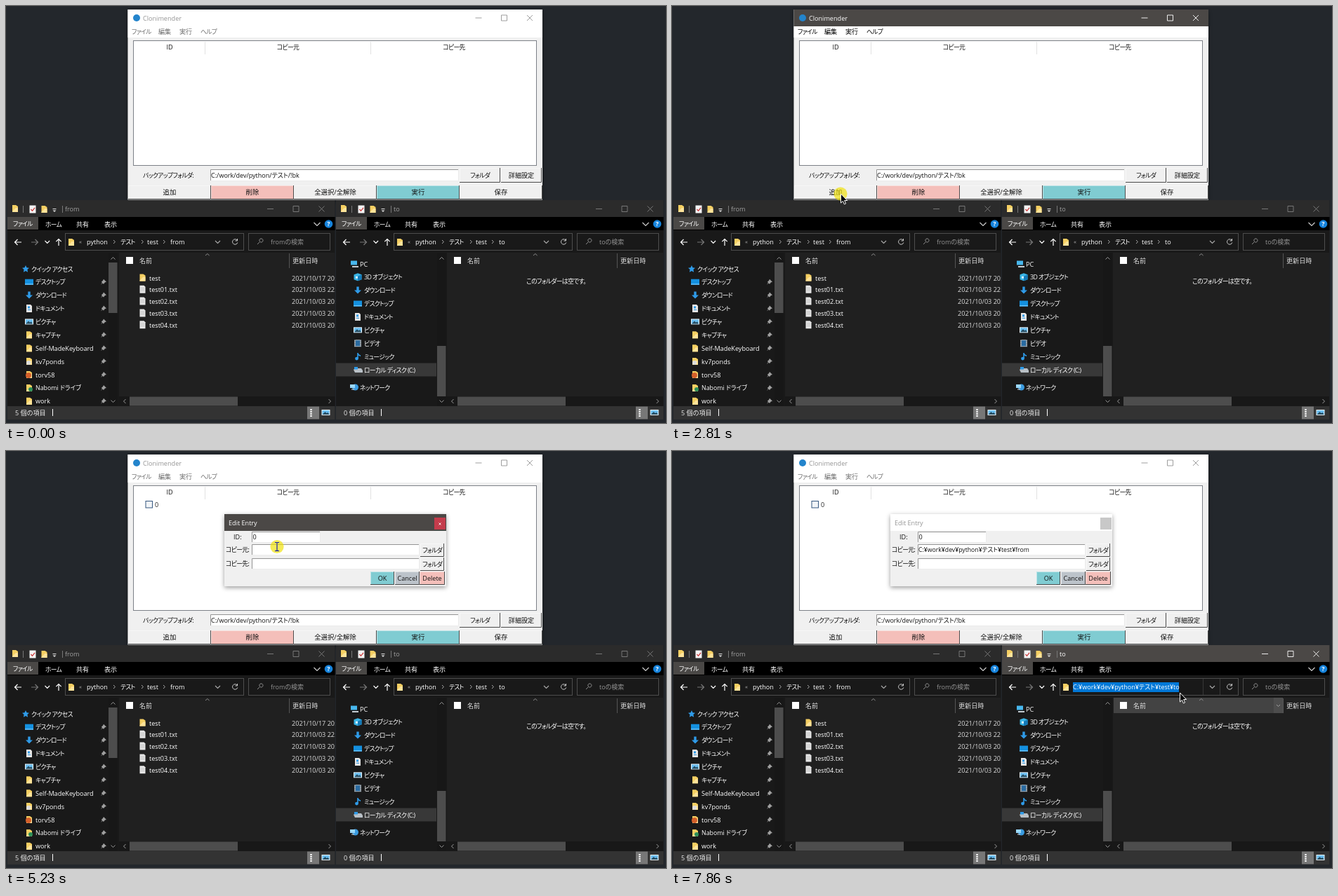
Write an HTML page that moves like this. It is 940 by 595 pixels and loops after 8 s.

```html
<!DOCTYPE html>
<html lang="ja">
<head>
<meta charset="utf-8">
<title>Backup tool demo</title>
<style>
html, body { margin: 0; width: 100%; height: 100%; overflow: hidden; background: #23272c; }
svg { display: block; width: 100vw; height: 100vh; }
text { font-family: "Open Sans", "Noto Sans CJK JP", sans-serif; font-feature-settings: "palt"; white-space: pre; }
.tight { letter-spacing: -.65px; }
</style>
</head>
<body>
<svg id="stage" viewBox="0 0 940 595" xmlns="http://www.w3.org/2000/svg"></svg>
<script>
const rect = (x, y, w, h, fill, extra = '') =>
  `<rect x="${x}" y="${y}" width="${w}" height="${h}" fill="${fill}" ${extra}/>`;
const line = (d, color, width = 1, extra = '') =>
  `<path d="${d}" fill="none" stroke="${color}" stroke-width="${width}" ${extra}/>`;
const shape = (d, fill) => `<path d="${d}" fill="${fill}"/>`;
const dot = (x, y, r, fill) => `<circle cx="${x}" cy="${y}" r="${r}" fill="${fill}"/>`;
const group = (id, body, extra = '') => `<g id="${id}" ${extra}>${body}</g>`;
const at = (x, y, body) => `<g transform="translate(${x} ${y})">${body}</g>`;
// Pure katakana labels are set tight, like a UI font.
const text = (x, y, s, fill = '#fff', { size, anchor = 'start', extra = '' } = {}) =>
  `<text x="${x}" y="${y}" fill="${fill}" text-anchor="${anchor}" ` +
  `font-size="${size || (/[ぁ-ヿ]/.test(s) ? 8.8 : 9.1)}" ` +
  `${/[ァ-ヿ]/.test(s) && !/[a-z]/.test(s) ? 'class="tight"' : ''} ${extra}>${s}</text>`;
const mid = (x, y, s, fill = '#111', size) => text(x, y, s, fill, { anchor: 'middle', size });

// Minimise, maximise and close signs; x is the centre of the first one.
const controls = (x, y, gap) =>
  line(`M${x - 4.5} ${y}h9M${x + gap - 4} ${y - 4}h8v8h-8z` +
    `M${x + 2 * gap - 4} ${y - 4}l8 8m0-8l-8 8`, 'currentColor', .9);

const button = (x, y, w, h, fill, label, size) =>
  rect(x, y, w, h, fill) +
  line(`M${x + .5} ${y + h - 1}V${y + .5}H${x + w - 1}`, '#fff', 1, 'opacity=".5"') +
  line(`M${x} ${y + h - .5}H${x + w - .5}V${y}`, '#4c4c4c') +
  mid(x + w / 2, y + h / 2 + 3.2, label, '#111', size);

const field = (x, y, w, h) =>
  rect(x, y, w, h, '#fff') +
  line(`M${x + .5} ${y + h}V${y + .5}H${x + w}`, '#949494') +
  line(`M${x} ${y + h - .5}H${x + w - .5}V${y}`, '#ececec');

const pink = '#f4bfba', teal = '#80ccd2', grey = '#f0f0f0', blue = '#2f9be8';

const folder = shape('M-4-5h5l3 2v8h-8z', '#f5cf62') + shape('M1-1h3v6h-8v-1z', '#ffe49a');
const sheet = shape('M-4-5.5h6l2 2v9h-8z', '#e6e6e6');
const icons = {
  folder,
  file: sheet + line('M-2.5-2h5m-5 2h5m-5 2h5', '#bbb', .8),
  star: shape('M0-5l1.5 3.3 3.5.4-2.6 2.4.7 3.6L0 2.9l-3.1 1.8.7-3.6L-5-1.3l3.5-.4z', blue),
  desk: rect(-6, -4, 12, 8, '#1490df') + rect(-6, 2.5, 12, 1.5, '#64c4ff'),
  down: shape('M-1.7-5h3.4v5H5L0 5-5 0h3.3z', blue),
  doc: sheet + rect(-2, -3, 3, 3, blue) + line('M-2 2h4', blue),
  pic: rect(-6, -4, 12, 8, '#e8f4fb') + rect(-5, -3, 10, 6, '#69bdf0') + shape('M-5 3l4-4 2 2 2-1 2 3z', '#264d62'),
  mark1: folder + dot(-1, 2, 3, '#ddd'),
  mark2: folder + dot(-1, 1, 4, '#d4602a'),
  mark3: folder + dot(2, 2, 3, '#2c8f57'),
  cube: shape('M0-5.5l5.5 2v7L0 5.5l-5.5-2v-7z', '#39b5e6') + shape('M0-1l5.5-2.5v7L0 5.5z', '#1479b8') + shape('M-3-1h3v3h-3z', '#d9f5ff'),
  film: rect(-5, -5, 10, 10, '#a9b8c4') + rect(-3, -4, 6, 8, '#2a6ba1') + line('M-4-5v10M4-5v10', '#333', 1, 'stroke-dasharray="1.2 1.2"'),
  note: line('M0 3V-5q0 3 4 4', blue, 1.6) + dot(-1.5, 3, 2.4, blue),
  disk: shape('M-6 0l2-2h9l2 3v3h-11z', '#b9c0c6') + rect(-5, -4, 5, 3.5, blue),
  net: dot(1.5, 0, 4.5, '#3a9be0') + rect(-6, -4, 7, 5, '#9bd8fa') + line('M-4 3h4', '#ddd'),
  pc: rect(-5, -4.5, 9, 6, '#48b8ee') + shape('M-3 3h9v2h-9z', '#c3ccd2')
};
const icon = (name, x, y) => at(x, y, icons[name]);

function app() {
  const tools = [['追加', grey], ['削除', pink], ['全選択/全解除', grey], ['実行', teal], ['保存', grey]];
  return rect(173.5, 5, 590.5, 271.5, grey, 'filter="url(#soft)"') +
    rect(173.5, 29, 590.5, 16, '#fff') +
    rect(173.5, 5, 590.5, 24, '#fff', 'id="appBar"') + dot(186, 17, 5, '#2384cc') +
    group('appTitle', text(195, 21, 'Clonimender', 'currentColor') + controls(673, 17, 36.5)) +
    group('appMenu', [[179, 'ファイル'], [217, '編集'], [247, '実行'], [277, 'ヘルプ']]
      .map(([x, s]) => text(x, 40, s, 'currentColor')).join('')) +
    rect(181.5, 49.5, 574, 178, '#fff', 'stroke="#7c8087"') +
    line('M283.5 51v18M519.5 51v18', '#e2e2e2') +
    mid(233, 62, 'ID') + mid(401.5, 62, 'コピー元') + mid(638, 62, 'コピー先') +
    group('entry', rect(199, 71.5, 9.5, 9.5, '#f2f5f8', 'stroke="#35577f"') + text(212, 80, '0', '#222')) +
    text(195, 245, 'バックアップフォルダ:', '#111') +
    field(291, 233, 354, 17) + text(292, 245, 'C:/work/dev/python/テスト/!bk', '#111', { size: 9 }) +
    button(646, 231, 58, 21, grey, 'フォルダ') + button(705, 231, 58, 21, grey, '詳細設定') +
    tools.map(([s, c], i) => button(174 + i * 118, 256, 118, 20, c, s, 9.4)).join('');
}

function dialog() {
  const rows = [[144, 'コピー元:'], [164, 'コピー先:']];
  return rect(311, 90, 316, 103, grey, 'filter="url(#soft)"') +
    rect(311, 90, 316, 24, '#fff', 'id="dlgBar"') +
    text(317, 106, 'Edit Entry', '#fff', { extra: 'id="dlgTitle"' }) +
    rect(610, 95, 16, 17, '#c43c4c', 'id="dlgClose"') + line('M616.5 102.5l3 3m0-3l-3 3', '#fff', .9, 'id="dlgCross"') +
    text(324, 126, 'ID:', '#111') + field(350, 115, 98, 16) + text(351.5, 126, '0', '#111') +
    rows.map(([y, s]) => text(313, y, s, '#111') + field(350, y - 11, 239, 16) +
      button(590, y - 12, 34, 19, grey, 'フォルダ')).join('') +
    group('pasted', text(351, 144, 'C:¥work¥dev¥python¥テスト¥test¥from', '#111', { size: 8.7 })) +
    button(519, 172, 34, 19, teal, 'OK') + button(554, 172, 35, 19, '#bcc3ca', 'Cancel') +
    button(589, 172, 36, 19, pink, 'Delete');
}

function addressBar(id, name) {
  const crumbs = [[115, 'python'], [163, 'テスト'], [201, 'test'], [234, name]];
  return rect(84.5, 324.5, 254, 24, '#191919', 'stroke="#4d4d4d"') +
    icon('folder', 93, 337) +
    group(id + 'Crumbs', text(104, 339, '«', '#aaa', { size: 8 }) +
      crumbs.map(([x, s]) => text(x, 340, s)).join('') +
      line('M153 334l2.5 2.5-2.5 2.5M193 334l2.5 2.5-2.5 2.5M224 334l2.5 2.5-2.5 2.5', '#aaa')) +
    group(id + 'Edit', rect(103, 330, id === 'left' ? 162 : 151, 14, '#0078d7') +
      text(103, 340, 'C:¥work¥dev¥python¥テスト¥test¥' + name, '#fff', { size: 9 }) +
      line('M288.5 325v23M312.5 325v23', '#383838')) +
    line('M298 335l3.5 3.5 3.5-3.5', '#aaa', 1.1) +
    line('M329 334a3.7 3.7 0 1 0 .8 3.5M329.5 332v3h-3', '#ccc') +
    rect(345.5, 324.5, 116, 24, '#191919', 'stroke="#4d4d4d"') +
    line('M358 340l3-3m-.2-2.8a2.6 2.6 0 1 1 .8 2.2z', '#999', .9) +
    text(377, 340, name + 'の検索', '#929292', { size: 9 });
}

function navItem([kind, label, y, root], pinned) {
  const pin = at(139, y, shape('M0-4l4 4-2 .5L0 3l-1.5-1.3L-4 4l2-3L-3.2 0-1-2z', '#a0a0a0'));
  return icon(kind, root ? 28 : 33, y) + text(root ? 36 : 42, y + 3.5, label) + (pinned && !root ? pin : '');
}

function explorer(id, dx, o) {
  const ribbon = [[56, 'ホーム'], [100, '共有'], [140, '表示']];
  const body = rect(161, 352, 308, 219, '#202020') + o.hover +
    rect(171, 358, 10, 10, '#fff') + text(190, 367, '名前', '#ddd') +
    line('M284 356l2.8-2.5 2.8 2.5', '#999', .9) +
    line('M403.5 353v21', '#555') + text(408, 367, '更新日時', '#ddd') + o.list +
    rect(161, 557, 308, 14, '#181818') + rect(176, 557.5, 154, 13, '#4d4d4d') +
    line('M170.5 561l-3 3 3 3M459.5 561l3 3-3 3', '#999');
  const win = rect(2, 277, 467, 313, '#191919') +
    rect(2, 277, 467, 24, '#2b2b2b', `id="${id}Bar"`) +
    icon('folder', 13, 289) + line('M24.5 285v10M80.5 285v10', '#777') +
    rect(33.5, 284.5, 9, 11, '#f4f4f4') + line('M35.5 290l2 2.3 3.5-4.5', '#c33', 1.2) +
    icon('folder', 54.5, 290) + line('M66.5 289.5h5', '#ddd') + shape('M66.5 291.5h5l-2.5 2.5z', '#ddd') +
    text(84, 293, o.name, 'currentColor', { extra: `id="${id}Title"` }) +
    group(id + 'Controls', controls(376.5, 289.5, 36.5)) +
    rect(2, 301, 467, 19, '#000') + rect(2, 301, 44, 18, '#4a4846') + text(10, 314, 'ファイル') +
    ribbon.map(([x, s]) => text(x, 314.5, s)).join('') +
    line('M438.5 309l4.5 4.5 4.5-4.5', '#ccc', 1.2) + dot(459.5, 311, 5.8, '#1583dc') +
    text(459.5, 314.2, '?', '#fff', { size: 9, anchor: 'middle', extra: 'font-weight="700"' }) +
    line('M22 337H12.5m4-4l-4 4 4 4M55.5 335l3.3 3.3 3.3-3.3M75 342v-9.5m-3.7 3.7l3.7-3.7 3.7 3.7', '#fff', 1.2) +
    line('M36 337h9.5m-4-4l4 4-4 4', '#777', 1.2) +
    addressBar(id, o.name) + o.nav +
    rect(146, 352, 13, 219, '#171717') + rect(146, o.thumb, 12.5, 72, '#4d4d4d') +
    line('M149.5 361.5l3-3 3 3M149.5 562.5l3 3 3-3', '#999') +
    `<g transform="translate(${dx ? -1 : 0} 0)">${body}</g>` +
    rect(2, 571, 467, 19, '#333') + text(13, 584, o.count + ' 個の項目', '#eee', { size: 9.1 }) +
    line('M66.5 575v10', '#fff') + rect(429, 571.5, 17, 18, '#777') +
    line('M434.5 575v11', '#fff', 2.4, 'stroke-dasharray="2 1"') + icon('pic', 455.5, 580);
  return `<g transform="translate(${dx} 0)" clip-path="url(#pane)">${win}</g>`;
}

const quick = [['star', 'クイック アクセス', 375, true]].concat(
  [['desk', 'デスクトップ'], ['down', 'ダウンロード'], ['doc', 'ドキュメント'], ['pic', 'ピクチャ'],
   ['folder', 'キャプチャ'], ['folder', 'Self-MadeKeyboard'], ['mark1', 'kv7ponds'], ['mark2', 'torv58'],
   ['mark3', 'Nabomi ドライブ'], ['folder', 'work']].map(([k, s], i) => [k, s, 393.7 + i * 18.9]));

const drives = [['pc', 'PC', 368, true]].concat(
  [['cube', '3D オブジェクト'], ['down', 'ダウンロード'], ['desk', 'デスクトップ'], ['doc', 'ドキュメント'],
   ['pic', 'ピクチャ'], ['film', 'ビデオ'], ['note', 'ミュージック'], ['disk', 'ローカル ディスク (C:)']]
    .map(([k, s], i) => [k, s, 386.7 + i * 18.9]), [['net', 'ネットワーク', 544, true]]);

const rowY = i => 388 + i * 16.8;
const files = ['test', 'test01.txt', 'test02.txt', 'test03.txt', 'test04.txt'].map((s, i) =>
  icon(i ? 'file' : 'folder', 194.5, rowY(i) - .5) + text(204, rowY(i) + 3.5, s) +
  text(407, rowY(i) + 3.5, ['2021/10/17 20:31', '2021/10/03 22:14'][i] || '2021/10/03 20:52', '#ddd')).join('');

document.getElementById('stage').innerHTML =
  `<defs><clipPath id="pane"><rect x="2" y="277" width="466.5" height="313"/></clipPath>
   <filter id="soft" x="-10%" y="-10%" width="120%" height="125%"><feDropShadow dx="0" dy="2" stdDeviation="3" flood-opacity=".4"/></filter></defs>` +
  rect(0, 0, 940, 595, '#23272c') + app() + group('dialog', dialog()) +
  explorer('left', 0, {
    name: 'from', count: 5, thumb: 366, list: files,
    nav: quick.map(q => navItem(q, true)).join(''),
    hover: rect(173, 0, 300, 16.8, '#333', 'id="rowHover"') +
      rect(173.5, 446.5, 300, 17, 'none', 'id="rowFocus" stroke="#6c6c6c"')
  }) +
  explorer('right', 468, {
    name: 'to', count: 0, thumb: 485,
    list: mid(316.5, 396, 'このフォルダーは空です。', '#fff'),
    nav: rect(2, 509.5, 143, 19, '#383838') + drives.map(d => navItem(d)).join(''),
    hover: group('headHover', rect(162, 352, 241, 22, '#434343') + rect(390, 352, 13, 22, '#4d4d4d') +
      line('M394 362l2.5 2.5 2.5-2.5', '#aaa', .9))
  }) +
  line('M265.5 330v14', '#fff', 1, 'id="caret"') +
  `<circle id="click" r="9.6" fill="#f0e000" opacity=".66"/>` +
  `<path id="arrow" d="M.5 0v13l2.9-2.7 2 4.6 2.2-1-2-4.4h4z" fill="#000" stroke="#fff" stroke-width="1"/>` +
  `<path id="beam" d="M-3-6h2.2l.8.7.8-.7h2.2M-3 6h2.2l.8-.7.8.7h2.2M0-6v12" fill="none" stroke="#fff" stroke-width="1.1" style="mix-blend-mode:difference"/>`;

const el = {};
document.querySelectorAll('[id]').forEach(n => el[n.id] = n);

// Pointer stops: time, x, y.
const stops = [
  [300, 664, 559], [630, 376, 398], [880, 376, 398], [1390, 268, 341], [2390, 268, 341],
  [2760, 240, 268], [3200, 240, 268], [3540, 302, 118], [3570, 302, 118], [3890, 334, 75],
  [4600, 334, 75], [5090, 386, 136.5], [5460, 386, 136.5], [5750, 525, 146], [5880, 525, 146],
  [6010, 524, 157], [6040, 524, 157], [6400, 795, 470], [6520, 795, 470], [6640, 776, 393],
  [6690, 776, 393], [7040, 722.5, 339], [7710, 722.5, 339], [7850, 723, 345], [8000, 723, 345]
];
const clicks = [[770, 850], [1400, 1560], [2780, 2900], [4020, 4090], [4150, 4220], [5230, 5360], [6410, 6490], [7240, 7370]];

function pointer(t) {
  const i = Math.max(1, stops.findIndex(s => s[0] > t));
  const [t0, x0, y0] = stops[i - 1], [t1, x1, y1] = stops[i];
  const u = Math.min(1, Math.max(0, (t - t0) / (t1 - t0))), k = u * u * (3 - 2 * u);
  return [x0 + (x1 - x0) * k, y0 + (y1 - y0) * k];
}

const show = (id, on) => el[id].style.display = on ? '' : 'none';
const fill = (id, c) => el[id].setAttribute('fill', c);
const color = (id, c) => el[id].style.color = c;

function draw(t) {
  const within = (a, b = 8000) => t >= a && t < b;
  const [x, y] = pointer(t);
  const appOn = within(2800, 4210), leftOn = within(830, 2800), rightOn = within(6430);
  const leftEdit = within(1580, 2800), rightEdit = within(7300), dlg = within(4210);
  const dlgOn = dlg && !rightOn;
  const bar = '#4b4846', off = '#949494';

  fill('appBar', appOn ? bar : '#fff');
  color('appTitle', appOn ? '#fff' : off);
  color('appMenu', appOn ? '#000' : '#6d6d6d');
  show('entry', within(2950));

  show('dialog', dlg);
  fill('dlgBar', dlgOn ? bar : '#fff');
  fill('dlgTitle', dlgOn ? '#fff' : off);
  fill('dlgClose', dlgOn ? '#c43c4c' : '#c8c8c8');
  show('dlgCross', dlgOn);
  show('pasted', within(5420));

  for (const [id, on, edit] of [['left', leftOn, leftEdit], ['right', rightOn, rightEdit]]) {
    fill(id + 'Bar', on ? bar : '#2b2b2b');
    color(id + 'Controls', on ? '#fff' : '#808080');
    color(id + 'Title', on && !within(6430, 6560) ? '#fff' : '#a0a0a0');
    show(id + 'Crumbs', !edit);
    show(id + 'Edit', edit);
  }
  const row = Math.floor((y - 379.6) / 16.8);
  show('rowHover', within(300, 1400) && x < 460 && row >= 0 && row < 5);
  el.rowHover.setAttribute('y', rowY(row) - 8.4);
  show('rowFocus', within(830, 1580));
  show('headHover', within(6760));
  show('caret', within(1580, 2060));

  const inField = dlg && x > 350 && x < 589 && (y > 133 && y < 149 || y > 153 && y < 169);
  const beam = inField || within(1580, 2420) || within(7300, 7740);
  show('beam', beam);
  show('arrow', t >= 300 && !beam);
  show('click', clicks.some(c => within(...c)));
  for (const id of ['beam', 'arrow', 'click'])
    el[id].setAttribute('transform', `translate(${x} ${y})`);
}

function tick() {
  draw(performance.now() % 8000);
  requestAnimationFrame(tick);
}
tick();
</script>
</body>
</html>
```
